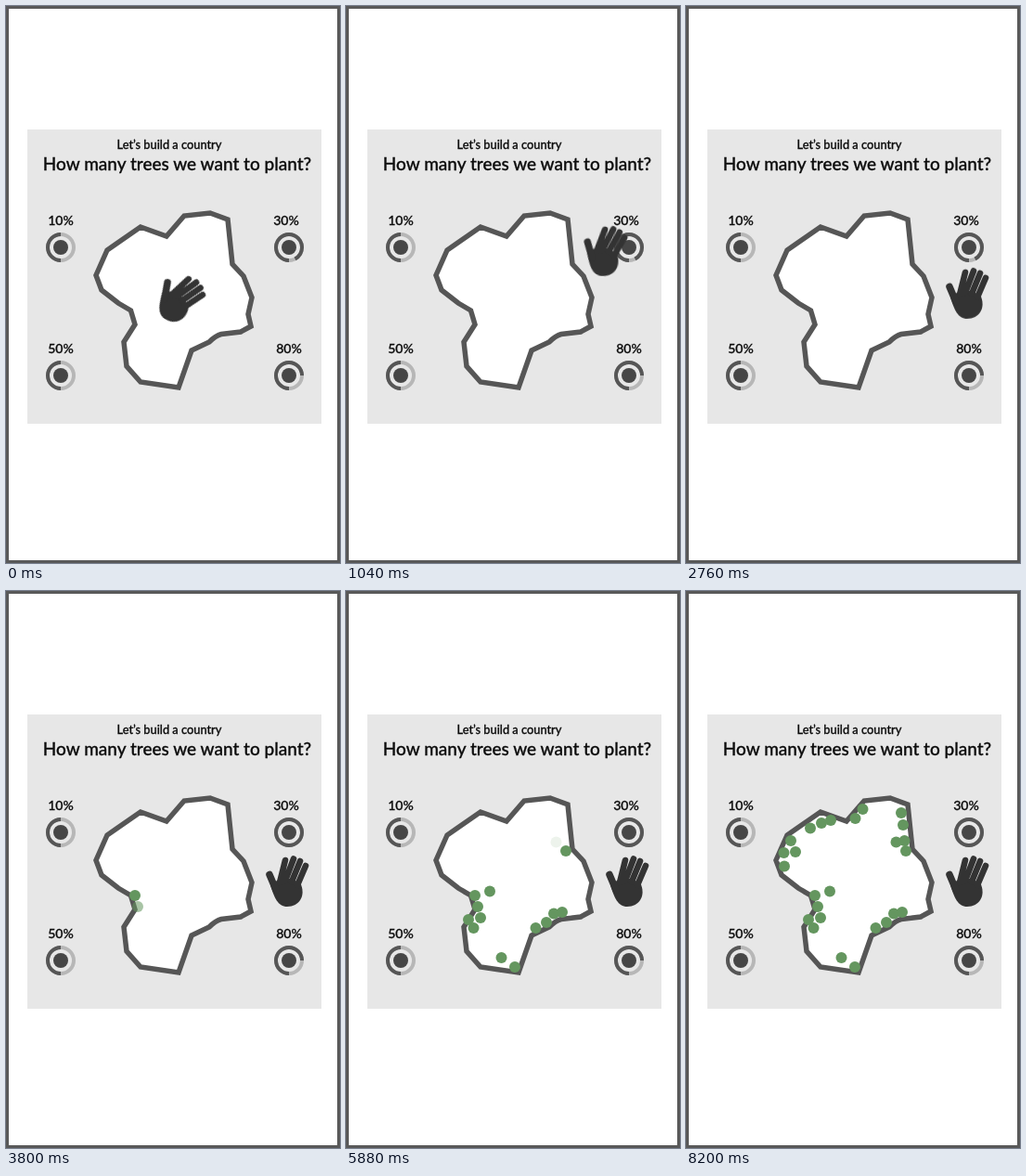
These frames come from a looping animation (360x600 px, 9.68 s). An HTML page:

```html
<!DOCTYPE html>
<html lang="en">
<head>
<meta charset="utf-8">
<title>Let’s build a country</title>
<style>
  @property --grown { syntax: "<number>"; inherits: true; initial-value: 0; }

  html, body { margin: 0; width: 100%; height: 100%; overflow: hidden; background: #fff; }
  svg { display: block; width: 100vw; height: 100vh; }

  text { font-family: Lato, "Open Sans", sans-serif; font-weight: 500; text-anchor: middle;
         fill: #0c0c0c; stroke: #0c0c0c; stroke-width: .3px; }
  .title { font-size: 19px; }
  .subtitle { font-size: 12.8px; }
  .label { font-size: 14px; }

  .ring { fill: none; stroke-width: 4; }
  .rest { stroke: #b7b7b7; }
  .done { stroke: #565656; }

  .trees { fill: #64965f; animation: grow 9680ms linear infinite; }
  .trees circle { opacity: calc(var(--grown) - var(--i)); }
  .chosen { animation: fill-up 9680ms linear infinite; }
  .hand-x { animation: hand-x 9680ms infinite; }
  .hand-y { animation: hand-y 9680ms infinite; }
  .hand { animation: hand-turn 9680ms infinite; }

  /* 1500 ms = 15.496%, 3000 ms = 30.992% */
  @keyframes hand-x {
    0% { transform: translateX(181px); animation-timing-function: cubic-bezier(.37, 0, .63, 1); }
    15.496%, 100% { transform: translateX(303px); }
  }
  @keyframes hand-y {
    0% { transform: translateY(322px); animation-timing-function: cubic-bezier(.28, 0, .15, 1); }
    15.496% { transform: translateY(270px); animation-timing-function: cubic-bezier(.37, 0, .63, 1); }
    30.992%, 100% { transform: translateY(322px); }
  }
  @keyframes hand-turn {
    0% { transform: rotate(33deg); animation-timing-function: cubic-bezier(.37, 0, .63, 1); }
    15.496%, 100% { transform: rotate(0deg); }
  }
  @keyframes fill-up {
    0%, 30.992% { stroke-dasharray: 332 28; }
    34.298%, 100% { stroke-dasharray: 360 0; }
  }
  /* one tree every 180 ms from 3520 ms to 8200 ms */
  @keyframes grow {
    0%, 36.364% { --grown: 0; }
    84.711%, 100% { --grown: 26; }
  }
</style>
</head>
<body>
<svg id="stage" viewBox="0 0 360 600">
  <rect x="1.5" y="1.5" width="357" height="597" fill="#fff" stroke="#595959" stroke-width="3"/>
  <rect x="23" y="133" width="317" height="317" fill="#e7e7e7"/>
  <text class="subtitle" x="176" y="154">Let’s build a country</text>
  <text class="title" x="184.5" y="177">How many trees we want to plant?</text>

  <path fill="#fff" stroke="#565656" stroke-width="5.5" d="M97 290L109 263L145 238L173 248L192 226L220 223
    L239 230L244 278L256 291L265 314L261 332L264 345L253 351L232 353.5Q226 355 219 362L200 371L186 411
    L145 405L130 388L127 362L139 343L134.500 328L121 320L103 306Z"/>

  <g id="dials"></g>
  <g id="trees" class="trees"></g>

  <g class="hand-x"><g class="hand-y"><g class="hand" fill="#333" stroke="#333" stroke-linecap="round">
    <path stroke="none" d="M-14 -8L-8 -12L3 -12L14 -8C21 6 13 18 0 18C-10 18 -14 8 -18 -5Z"/>
    <path fill="none" stroke-width="6.6" d="M-8 -8L-2 -32M-2 -10L7 -33.500M5 -9L14 -31M11 -5L20 -26"/>
    <path fill="none" stroke-width="7.5" d="M-19 -16.500L-12 0"/>
  </g></g></g>
</svg>
<script>
  const make = (parent, tag, attrs) => {
    const node = document.createElementNS("http://www.w3.org/2000/svg", tag);
    for (const key in attrs) node.setAttribute(key, attrs[key]);
    return parent.appendChild(node);
  };

  // label, label x, center x, center y, filled degrees
  const dials = [
    ["10%", 59, 59, 260, 180],
    ["30%", 302, 305, 260, 332],
    ["50%", 59, 59, 398, 180],
    ["80%", 305, 305, 398, 270],
  ];
  const dialLayer = document.getElementById("dials");
  for (const [label, labelX, cx, cy, filled] of dials) {
    const ring = { cx, cy, r: 14 };
    make(dialLayer, "text", { class: "label", x: labelX, y: cy - 24 }).textContent = label;
    make(dialLayer, "circle", { ...ring, class: "ring rest" });
    make(dialLayer, "circle", {
      ...ring,
      class: "ring done" + (label === "30%" ? " chosen" : ""),
      pathLength: 360,
      "stroke-dasharray": `${filled} ${360 - filled}`,
      transform: `rotate(90 ${cx} ${cy})`,
    });
    make(dialLayer, "circle", { cx, cy, r: 8, fill: "#464646" });
  }

  // tree positions in planting order
  const trees = [
    [139, 328], [142, 340], [145, 352], [132, 354], [137.5, 363], [204.5, 363],
    [237, 280], [155, 323.5], [182, 405], [216, 357], [224, 347.5], [233, 346],
    [167.5, 395], [226.5, 270.5], [235.5, 269], [234, 252], [232, 239],
    [190.5, 235], [182.5, 245], [156, 247], [146, 250], [134, 255.5],
    [113, 269], [118, 281], [105.5, 282], [106, 296.5],
  ];
  const treeLayer = document.getElementById("trees");
  trees.forEach(([cx, cy], i) =>
    make(treeLayer, "circle", { cx, cy, r: 6, style: `--i: ${i}` }));
</script>
</body>
</html>
```
